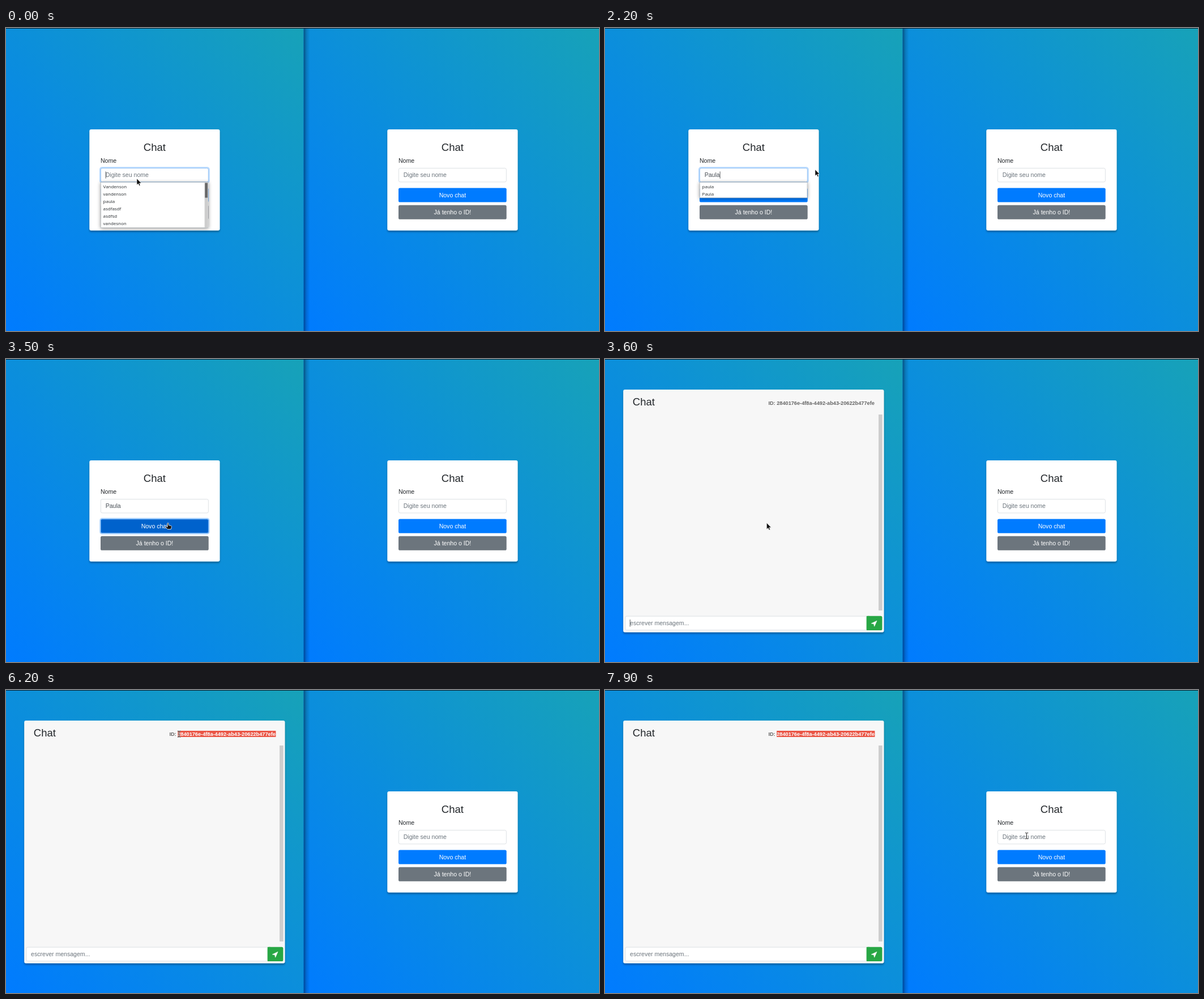
Recreate the animation shown at these times as an HTML page. Size 1047 px wide and 535 px high, loop 8000 ms.

```html
<!DOCTYPE html>
<html lang="pt-BR">
<head>
<meta charset="utf-8">
<title>Chat</title>
<style>
  html, body { margin: 0; width: 100%; height: 100%; overflow: hidden; background: #007bff; }
  svg { display: block; width: 100vw; height: 100vh; }
  text { font-family: "Liberation Sans", Arial, sans-serif; font-size: 10.56px; white-space: pre; }
  .title { font-size: 18.5px; fill: #212529; }
  .dark { fill: #212529; }
  .hint { fill: #6c757d; }
  .typed { fill: #495057; }
  .btn { fill: #fff; text-anchor: middle; }
  .item { font: 7.92px "Noto Sans", "Open Sans", sans-serif; fill: #33373a; }
  .id { font-size: 9.2px; font-weight: bold; }
  .caret { fill: #33383d; }
</style>
</head>
<body>
<svg id="stage" viewBox="0 0 1047 535"></svg>
<script>
const LOOP = 8000;
const NAME = "Paula";
const ID = "ID: 2840176e-4f8a-4492-ab43-20622b477efe";
const ALL = ["Vandenson", "vandenson", "paula", "asdfasdf", "asdfsd", "vandesnon"];
const FOUND = ["paula", "Paula"];

const rect = (x, y, w, h, fill, more = "") =>
  `<rect x="${x}" y="${y}" width="${w}" height="${h}" fill="${fill}" ${more}/>`;
const text = (x, y, cls, s, more = "") =>
  `<text x="${x}" y="${y}" class="${cls}" ${more}>${s}</text>`;
const field = (x, y, w, h) =>
  rect(x + .35, y + .35, w - .7, h - .7, "#fff", 'rx="2.6" stroke="#ced4da" stroke-width=".7"');
const ring = (id, x, y, w, h) => `<g id="${id}">` +
  rect(x - 1, y - 1, w + 2, h + 2, "none", 'rx="3.6" stroke="#007bff" stroke-opacity=".28" stroke-width="2.1"') +
  rect(x + .35, y + .35, w - .7, h - .7, "none", 'rx="2.6" stroke="#80bdff" stroke-width=".7"') + "</g>";

const pane = (x, w) => rect(x, 1, w, 534, "url(#sky)");

const login = (p, dx) => `<g id="${p}" transform="translate(${dx})">
  ${rect(147.3, 179, 230.2, 178.5, "#fff", 'rx="3" filter="url(#lift)"')}
  ${text(262.4, 216.5, "title", "Chat", 'text-anchor="middle"')}
  ${text(167, 237.6, "dark", "Nome")}
  ${field(167, 247.2, 190.7, 25)}
  ${text(175.7, 263.2, "hint", "Digite seu nome", `id="${p}Hint"`)}
  ${rect(167, 282.6, 190.7, 25, "#007bff", `rx="2.6" id="${p}New"`)}
  ${text(262.4, 298.6, "btn", "Novo chat")}
  ${rect(167, 312.8, 190.7, 25, "#6c757d", `rx="2.6" id="${p}Join"`)}
  ${text(262.4, 328.8, "btn", "Já tenho o ID!")}
</g>`;

const list = (id, items, h) => `<g id="${id}">
  ${rect(167.4, 272.4, 189.6, h, "#fff", 'stroke="#b4b8bb" stroke-width=".7" filter="url(#drop)"')}
  ${items.map((s, i) => text(171.6, 282.9 + i * 13.1, "item", s)).join("")}</g>`;

const stage = document.getElementById("stage");
stage.innerHTML = `
<defs>
  <linearGradient id="sky" x1="0" y1="1" x2="1" y2="0">
    <stop stop-color="#007bff"/><stop offset="1" stop-color="#17a2b8"/>
  </linearGradient>
  <linearGradient id="edge">
    <stop stop-opacity=".42"/><stop offset=".45" stop-opacity=".15"/><stop offset="1" stop-opacity="0"/>
  </linearGradient>
  <filter id="lift"><feDropShadow dx="0" dy="2.6" stdDeviation="1.7" flood-opacity=".32"/></filter>
  <filter id="drop" y="-20%" height="150%"><feDropShadow dx="0" dy="1" stdDeviation="3" flood-opacity=".45"/></filter>
  <clipPath id="clip"><rect id="clipBox" y="70" width="0" height="16"/></clipPath>
</defs>
${pane(0, 525.6)}${pane(525.6, 521.4)}
${rect(525.6, 1, 11, 534, "url(#edge)")}
${rect(0, 0, 1047, 1, "#0b1a24")}
${login("a", 0)}${login("b", 526)}
<g id="form">
  ${ring("nameRing", 167, 247.2, 190.7, 25)}
  ${ring("newRing", 167, 282.6, 190.7, 25)}
  ${text(175.7, 263.2, "typed", "", 'id="typed"')}
  ${rect(0, 253.3, .8, 12.4, "#33383d", 'id="nameCaret"')}
  ${list("all", ALL, 80)}
  <g id="bar">${rect(350.6, 272.8, 6, 79.2, "#cdcdcd")}${rect(351.2, 273.6, 4.8, 26, "#696969")}</g>
  ${list("found", FOUND, 27.4)}
</g>
<g id="chat">
  ${rect(32.2, 54, 460.3, 428.4, "#f7f7f7", 'rx="3" filter="url(#lift)"')}
  ${text(48.8, 81.8, "title", "Chat")}
  ${text(288.4, 80.8, "id", ID, 'id="idText" fill="#666"')}
  <g clip-path="url(#clip)">
    ${rect(280, 72, 200, 11, "#ea5545")}
    ${text(288.4, 80.8, "id", ID, 'fill="#fff"')}
  </g>
  ${rect(483, 98, 6.6, 346, "#cdcdcd")}
  ${field(35.5, 453.8, 428, 25.2)}
  ${rect(461.8, 453.8, 27.6, 25.2, "#28a745", 'rx="2.6"')}
  ${rect(461.8, 453.8, 5, 25.2, "#28a745")}
  <path d="M480 462.2L470.2 466.9L474.6 467.8L475.6 472.2Z" fill="#fff" stroke="#fff" stroke-width=".6" stroke-linejoin="round"/>
  ${ring("msgRing", 35.5, 453.8, 427, 25.2)}
  ${text(44.1, 470, "hint", "escrever mensagem...")}
  ${rect(43.8, 460, .8, 12.6, "#33383d", 'id="msgCaret"')}
  <g id="tip">
    ${rect(304.4, 91.4, 149.2, 18.2, "#fcfcfc", 'rx="1.5" stroke="#bfc3c6" stroke-width=".7"')}
    ${text(379, 103.2, "item", "Copie o ID e envie a seu contato", 'text-anchor="middle"')}
  </g>
</g>
<g id="cursor">
  <path id="arrow" d="M0 0V11L2.6 8.7L4.3 12.5L6 11.7L4.4 8H7.8Z" fill="#111" stroke="#fff" stroke-opacity=".75" stroke-width=".6"/>
  <path id="hand" d="M-.6 .5Q.6-.8 1.5 .5V4L6 5Q7 5.5 6.8 7L5.8 11H-.3L-4.6 6.7Q-4.6 5.3-3 5.7L-.6 7.3Z" fill="#111" stroke="#fff" stroke-width=".8"/>
  <g id="beam" fill="none">
    <path d="M-2.7-5.2H-.6L0-4.6L.6-5.2H2.7M0-4.6V4.6M-2.7 5.2H-.6L0 4.6L.6 5.2H2.7" stroke="#fff" stroke-opacity=".7" stroke-width="2"/>
    <path d="M-2.7-5.2H-.6L0-4.6L.6-5.2H2.7M0-4.6V4.6M-2.7 5.2H-.6L0 4.6L.6 5.2H2.7" stroke="#222"/>
  </g>
</g>`;

const $ = id => document.getElementById(id);
const set = (id, name, value) => $(id).setAttribute(name, value);
const show = (id, on) => set(id, "opacity", +on);

// time, x, y of the pointer's hot spot
const PATH = [
  [0, 231, 266], [1800, 231, 266], [2200, 371, 250], [2800, 371, 250], [2900, 285.5, 289.5],
  [3700, 285.5, 289.5], [4100, 420, 175], [4200, 420, 175], [4500, 511, 67], [4700, 485, 73.5],
  [4900, 478, 77.5], [5200, 477, 77.5], [5900, 309, 77.5], [6000, 309, 77.5], [6200, 305.6, 77.8],
  [7000, 305.6, 77.8], [7400, 690, 262], [7600, 778, 322], [7700, 778, 322],
  [7800, 765, 209], [7900, 744.5, 257.5]
];
const SHAPES = [[0, "arrow"], [2900, "hand"], [3600, "arrow"], [4900, "beam"],
  [7100, "arrow"], [7500, "hand"], [7800, "beam"]];
const KEYS = [600, 900, 1100, 1200, 1400];

function pointer(t) {
  const n = PATH.findIndex(p => p[0] > t);
  if (n < 0) return PATH[PATH.length - 1].slice(1);
  const [t0, x0, y0] = PATH[n - 1], [t1, x1, y1] = PATH[n];
  const k = (t - t0) / (t1 - t0);
  return [x0 + (x1 - x0) * k, y0 + (y1 - y0) * k];
}

// left edge of the selection, snapped to a character
function selectionStart(x) {
  const el = $("idText");
  for (let i = 4; i < ID.length; i++) {
    const a = el.getStartPositionOfChar(i).x, b = el.getEndPositionOfChar(i).x;
    if (x <= (a + b) / 2) return a;
  }
  return el.getEndPositionOfChar(ID.length - 1).x;
}

function draw(ms) {
  const t = Math.floor(ms / 100) * 100;
  const within = (a, b) => t >= a && t < b;
  const [x, y] = pointer(t);
  const inChat = t >= 3600;

  show("a", !inChat);
  show("form", !inChat);
  show("chat", inChat);

  const name = NAME.slice(0, KEYS.filter(k => k <= t).length);
  $("typed").textContent = name;
  show("aHint", !name);
  set("nameCaret", "x", 175.7 + (name ? $("typed").getComputedTextLength() : 0));
  show("nameCaret", t < 2400);
  set("nameRing", "opacity", t < 2400 ? 1 : t < 2500 ? .35 : 0);
  show("all", t < 800);
  show("bar", t < 800);
  show("found", within(800, 2400));

  for (const [p, dx] of [["a", 0], ["b", 526]]) {
    const over = top => x > 167 + dx && x < 357.7 + dx && y > top && y < top + 25;
    const pressed = p === "a" && t >= 3300;
    set(p + "New", "fill", pressed ? "#0062cc" : over(282.6) ? "#0069d9" : "#007bff");
    set(p + "Join", "fill", over(312.8) ? "#5a6268" : "#6c757d");
  }
  set("newRing", "opacity", t < 3300 ? 0 : t < 3400 ? .5 : 1);

  set("msgRing", "opacity", within(3700, 5100) ? 1 : within(5100, 5200) ? .4 : 0);
  show("msgCaret", within(3600, 4100) || within(4600, 5100));
  const from = t < 5200 ? 476.5 : selectionStart(t < 6200 ? x : 300);
  set("clipBox", "x", from);
  set("clipBox", "width", Math.max(0, 476.4 - from));
  show("tip", within(6800, 7100));

  const shape = SHAPES.filter(s => s[0] <= t).pop()[1];
  for (const s of ["arrow", "hand", "beam"]) show(s, s === shape);
  set("cursor", "transform", `translate(${x} ${y})`);
}

const begin = performance.now();
function tick() {
  draw((performance.now() - begin) % LOOP);
  requestAnimationFrame(tick);
}
tick();
</script>
</body>
</html>
```
